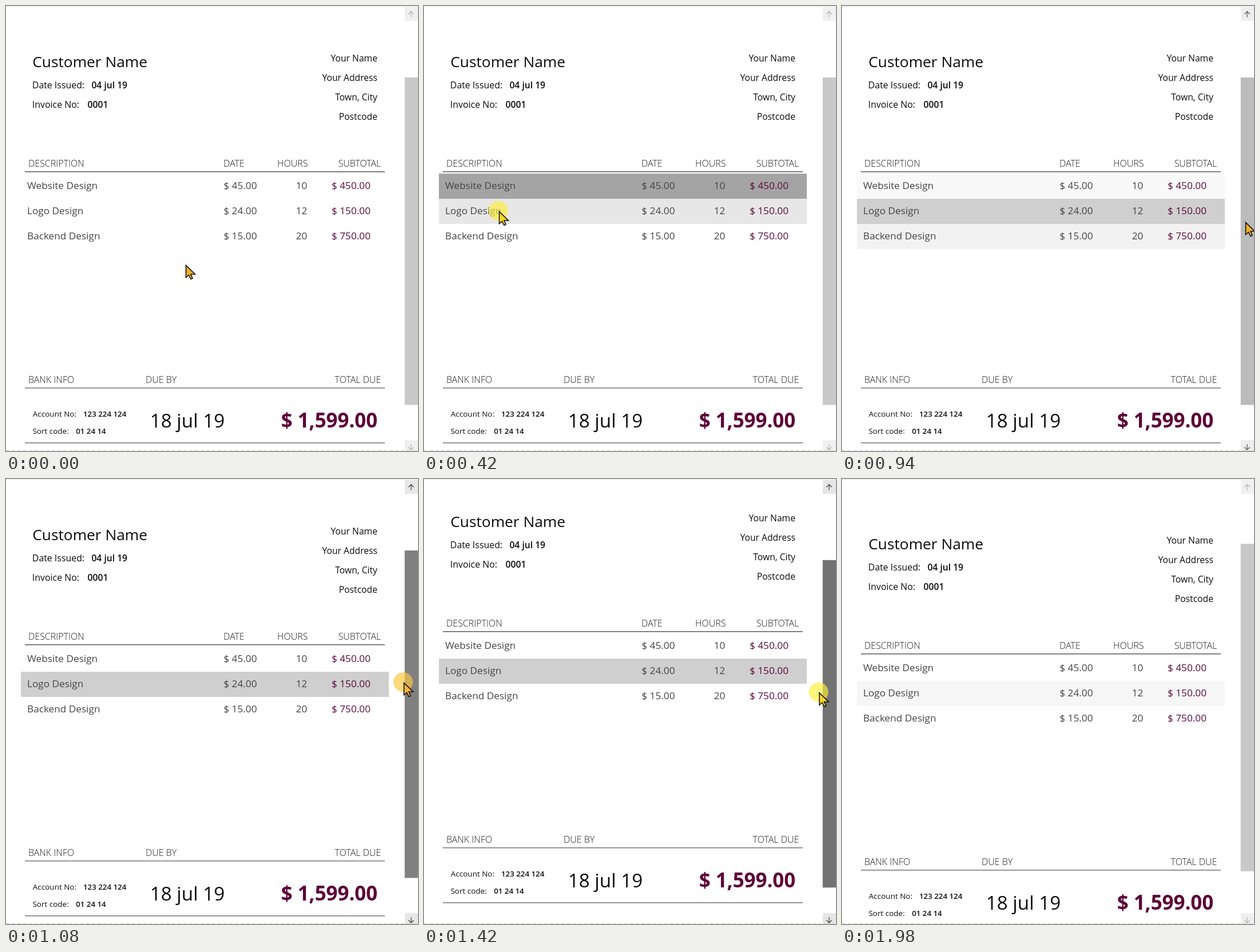
Animation of 720x778 px, one loop 2050 ms. Source, as an HTML page with a canvas:

```html
<!DOCTYPE html>
<html lang="en">
<head>
<meta charset="utf-8">
<title>Invoice</title>
<style>
html, body { margin: 0; width: 100%; height: 100%; overflow: hidden; background: #fff; }
canvas { display: block; }
</style>
</head>
<body>
<canvas id="stage" width="720" height="778"></canvas>
<script>
const ctx = document.getElementById('stage').getContext('2d');
const LOOP = 2050, STEPS = 30;
const GRAB = 16, RELEASE = 23, GRAB_Y = 355;
const FONT = '"Open Sans", "Noto Sans", sans-serif';
const PLUM = '#5c0a3c', INK = '#0c0c0c', SOFT = '#444', HEAD = '#1c1c1c';

// Pointer stops: step, x, y
const path = [[0, 313, 452], [4, 127, 318], [6, 130, 358], [8.5, 150, 400], [14, 704, 377],
  [GRAB, 694, GRAB_Y], [18, 693, 402], [19, 692, 402], [RELEASE, 687, 343]];

const rows = [
  ['Website Design', '$ 45.00', '10', '$ 450.00'],
  ['Logo Design', '$ 24.00', '12', '$ 150.00'],
  ['Backend Design', '$ 15.00', '20', '$ 750.00']
];

function ease(k, a, b) {
  const u = Math.min(1, Math.max(0, (k - a) / (b - a)));
  return u * u * (3 - 2 * u);
}

// Rises from a to b, holds, falls from c to d
const pulse = (k, a, b, c, d) => ease(k, a, b) * (1 - ease(k, c, d));

const rowShade = [
  k => 91 * pulse(k, 2.5, 4, 6, 15.5),
  k => 48 * pulse(k, 4, 8, 25, 30.5),
  k => 50 * pulse(k, 6, 9, 10, 16) + 26 * pulse(k, 23, 25, 25, 28)
];

function pointer(k) {
  let [, x, y] = path[0];
  for (let i = 1; i < path.length; i++) {
    const u = ease(k, path[i - 1][0], path[i][0]);
    x += (path[i][1] - path[i - 1][1]) * u;
    y += (path[i][2] - path[i - 1][2]) * u;
  }
  return [x, y];
}

const scroll = k => k < GRAB ? 0 : Math.round((GRAB_Y - pointer(k)[1]) * 1.3);

const gray = v => `rgb(${v}, ${v}, ${v})`;

function box(x, y, w, h, color) {
  ctx.fillStyle = color;
  ctx.fillRect(x, y, w, h);
}

function disc(x, y, r, color) {
  ctx.fillStyle = color;
  ctx.beginPath();
  ctx.arc(x, y, r, 0, Math.PI * 2);
  ctx.fill();
}

function text(str, x, y, size, color = INK, weight = 400, align = 'left') {
  ctx.font = `${weight} ${size}px ${FONT}`;
  ctx.textAlign = align;
  ctx.fillStyle = color;
  ctx.fillText(str, x, y);
}

const heading = (str, x, y, align) => text(str, x, y, 16, HEAD, 300, align);
const rule = (y, color) => box(33, y, 629, 1.5, color);

function field(label, value, x, valueX, y, size) {
  text(label, x, y, size);
  text(value, valueX, y, size - 0.2, INK, 600);
}

function drawPage(k) {
  ctx.save();
  ctx.beginPath();
  ctx.rect(0, 2, 696, 775);
  ctx.clip();
  ctx.translate(0, scroll(k));

  text('Customer Name', 46.2, 107, 26.3);
  field('Date Issued:', '04 jul 19', 45.8, 149.4, 144, 15.9);
  field('Invoice No:', '0001', 45.8, 142.6, 178, 15.9);
  ['Your Name', 'Your Address', 'Town, City', 'Postcode'].forEach((s, i) =>
    text(s, 649, 97 + i * 34, 15.7, INK, 400, 'right'));

  heading('DESCRIPTION', 39, 281);
  heading('DATE', 380, 281);
  heading('HOURS', 474, 281);
  heading('SUBTOTAL', 655.3, 281, 'right');
  rule(289, '#5a5a5a');

  rows.forEach(([name, price, hours, sum], i) => {
    const base = 320 + i * 43.9;
    const shade = rowShade[i](k);
    if (shade > 0) box(26, 293 + i * 44, 643, 44, gray(255 - shade));
    text(name, 37, base, 17.2, SOFT);
    text(price, 380.3, base, 17.2, SOFT);
    text(hours, 526.3, base, 17.2, SOFT, 400, 'right');
    text(sum, 569, base, 17.2, PLUM);
  });

  heading('BANK INFO', 39, 658.5);
  heading('DUE BY', 244, 658.5);
  heading('TOTAL DUE', 655.3, 658.5, 'right');
  rule(667, '#777');
  field('Account No:', '123 224 124', 46.8, 135, 718, 13.5);
  field('Sort code:', '01 24 14', 46.4, 122.2, 748, 13.5);
  text('18 jul 19', 251.8, 736.5, 33.2);
  text('$ 1,599.00', 649.2, 736.5, 34.9, '#5c0037', 700, 'right');
  rule(763, '#777');

  disc(47, 818, 9.5, '#5c0037');
  text('Thank you!', 75.8, 827, 26.2, SOFT, 300);
  text('me@our.example', 539.5, 831, 10.6, INK, 300, 'right');
  text('55 0142', 591.5, 831, 10.6, INK, 300, 'right');
  text('website.com', 662.5, 831, 10.6, INK, 300, 'right');
  ctx.restore();
}

function drawArrow(y, dir, color) {
  ctx.strokeStyle = color;
  ctx.lineWidth = 1.3;
  ctx.beginPath();
  ctx.moveTo(708, y + 5 * dir);
  ctx.lineTo(708, y - 5 * dir);
  ctx.moveTo(703.3, y - 0.3 * dir);
  ctx.lineTo(708, y - 5 * dir);
  ctx.lineTo(712.7, y - 0.3 * dir);
  ctx.stroke();
}

function drawFrame(k) {
  const hover = pulse(k, 11, 15, 22, 24), press = pulse(k, 13, 17, 22, 24);
  const button = gray(240 - 11 * press), arrow = gray(182 - 105 * hover);
  box(697, 2, 23, 24, button);
  box(697, 759, 23, 19, button);
  box(696.7, 125 - scroll(k) * 0.73, 23.3, 572.5, gray(200 - 85 * press));
  drawArrow(14.5, 1, arrow);
  drawArrow(771, -1, arrow);
  box(0, 0, 720, 1.5, '#ececec');
  for (let x = 0; x < 720; x += 10) box(x, 777, 6, 1, '#c9c9c9');
}

function drawCursor(k) {
  if (k > RELEASE) return;
  const [x, y] = pointer(k);
  const pressed = k >= GRAB || (k >= 4 && k <= 7);
  const warm = k >= GRAB && k < 20;
  if (pressed) disc(x, y, 17, warm ? 'rgba(252,200,66,.68)' : 'rgba(255,240,56,.65)');
  ctx.save();
  ctx.translate(x + 0.5, y + 0.5);
  ctx.beginPath();
  ctx.moveTo(1, 1);
  [[1, 22], [6, 18], [9.5, 25], [12.5, 23.5], [9.5, 16.5], [17, 16.5]].forEach(p => ctx.lineTo(...p));
  ctx.closePath();
  ctx.fillStyle = !pressed ? '#f1ae2c' : warm ? '#ffb041' : '#f8d523';
  ctx.fill();
  ctx.strokeStyle = '#111';
  ctx.lineWidth = 1.6;
  ctx.stroke();
  ctx.restore();
}

function draw(now) {
  const t = now % LOOP;
  const k = Math.min(STEPS - 1, Math.floor((t + 22) * STEPS / LOOP));
  box(0, 0, 720, 778, '#fff');
  drawPage(k);
  drawFrame(k);
  drawCursor(k);
}

const start = performance.now();
function tick() {
  draw(performance.now() - start);
  requestAnimationFrame(tick);
}
tick();
</script>
</body>
</html>
```
